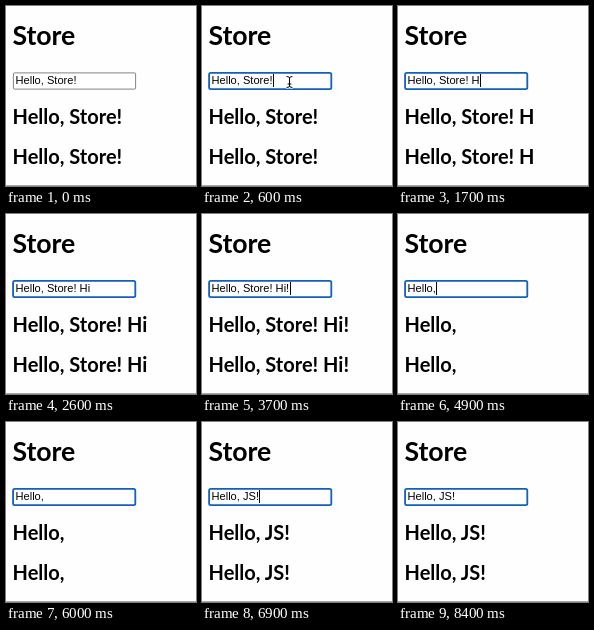
Animation of 190x180 px, one loop 8.5 s. Source, as an HTML page:

```html
<!DOCTYPE html>
<html lang="en">
<head>
<meta charset="utf-8">
<title>Store</title>
<style>
  html, body { margin: 0; width: 100%; height: 100%; overflow: hidden; background: #fefefe; }
  svg { display: block; width: 190px; height: 180px; }
  text { white-space: pre; fill: #000; }
  .head { font: bold 20px Lato, "Noto Sans CJK KR", sans-serif; }
  .title { font-size: 26.67px; }
  .field { font: 11.1px "Liberation Sans", Arial, sans-serif; }
</style>
</head>
<body>
<svg viewBox="0 0 190 180" xmlns="http://www.w3.org/2000/svg">
  <rect width="190" height="180" fill="#fefefe"/>
  <text class="head title" x="6.4" y="39">Store</text>
  <rect id="box" fill="#fff"/>
  <text id="typed" class="field" x="9.5" y="78"></text>
  <rect id="caret" y="68" width="1" height="13"/>
  <text class="head echo" x="6.6" y="118"></text>
  <text class="head echo" x="6.6" y="158"></text>
  <rect y="179" width="190" height="1" fill="#a8a8a8"/>
  <path id="arrow" d="M0 0V11.5L2.7 9L4.5 13L6.3 12.2L4.6 8.3H8.2Z" stroke="#fff" stroke-width=".8"/>
  <g id="beam" fill="none" stroke-linecap="round">
    <path d="M-2.5 -5.5Q0 -5.5 0 -4V4Q0 5.5 -2.5 5.5M2.5 -5.5Q0 -5.5 0 -4M0 4Q0 5.5 2.5 5.5M-1.5 2H1.5" stroke="#fff" stroke-width="2.4"/>
    <path d="M-2.5 -5.5Q0 -5.5 0 -4V4Q0 5.5 -2.5 5.5M2.5 -5.5Q0 -5.5 0 -4M0 4Q0 5.5 2.5 5.5M-1.5 2H1.5" stroke="#000"/>
  </g>
</svg>
<script>
const LOOP = 8500, FOCUS = 600, BLINK = 500;

// [time, field value]
const typing = [
  [0, "Hello, Store!"], [1000, "Hello, Store! "], [1700, "Hello, Store! H"],
  [2100, "Hello, Store! Hi"], [2700, "Hello, Store! Hi!"], [3800, ""],
  [4000, "H"], [4300, "He"], [4400, "Hel"], [4500, "Hell"], [4700, "Hello"],
  [4900, "Hello,"], [5500, "Hello, "], [6300, "Hello, J"], [6400, "Hello, JS"],
  [6900, "Hello, JS!"]
];

// [time, shape, x, y]
const pointer = [
  [0, ""], [100, "arrow", 92, 167], [200, "arrow", 91, 136], [300, "arrow", 89, 98],
  [400, "beam", 87.5, 76], [800, "beam", 97, 78], [900, "beam", 113, 81], [1000, ""]
];

const $ = id => document.getElementById(id);
const echoes = document.querySelectorAll(".echo");
const at = (steps, t) => steps.findLast(s => s[0] <= t);

function set(el, attrs) {
  for (const k in attrs) el.setAttribute(k, attrs[k]);
}

function drawBox(t) {
  const plain = { x: 7.4, y: 66.9, width: 122.2, height: 16.2, rx: 1, "stroke-width": 0.9 };
  const ring = { x: 7.1, y: 66.9, width: 122.2, height: 16.2, rx: 1.6, "stroke-width": 1.8 };
  if (t >= FOCUS) set($("box"), { ...ring, stroke: "#1160bd" });
  else set($("box"), { ...plain, stroke: t >= 400 ? "#4f4f4f" : "#767676" });
}

function drawText(t) {
  const [since, value] = at(typing, t);
  $("typed").textContent = value;
  echoes.forEach(e => e.textContent = value);
  const idle = t - Math.max(since, FOCUS);
  const on = t >= FOCUS && Math.floor(idle / BLINK) % 2 === 0;
  const width = value ? $("typed").getComputedTextLength() : 0;
  set($("caret"), { x: Math.round(9.85 + width), visibility: on ? "visible" : "hidden" });
}

function drawPointer(t) {
  const [, shape, x, y] = at(pointer, t);
  for (const id of ["arrow", "beam"]) {
    const shown = id === shape;
    set($(id), { visibility: shown ? "visible" : "hidden" });
    if (shown) set($(id), { transform: `translate(${x} ${y})` });
  }
}

const start = performance.now();
function frame(now) {
  const t = Math.max(0, now - start) % LOOP;
  drawBox(t);
  drawText(t);
  drawPointer(t);
  requestAnimationFrame(frame);
}
frame(start);
</script>
</body>
</html>
```
